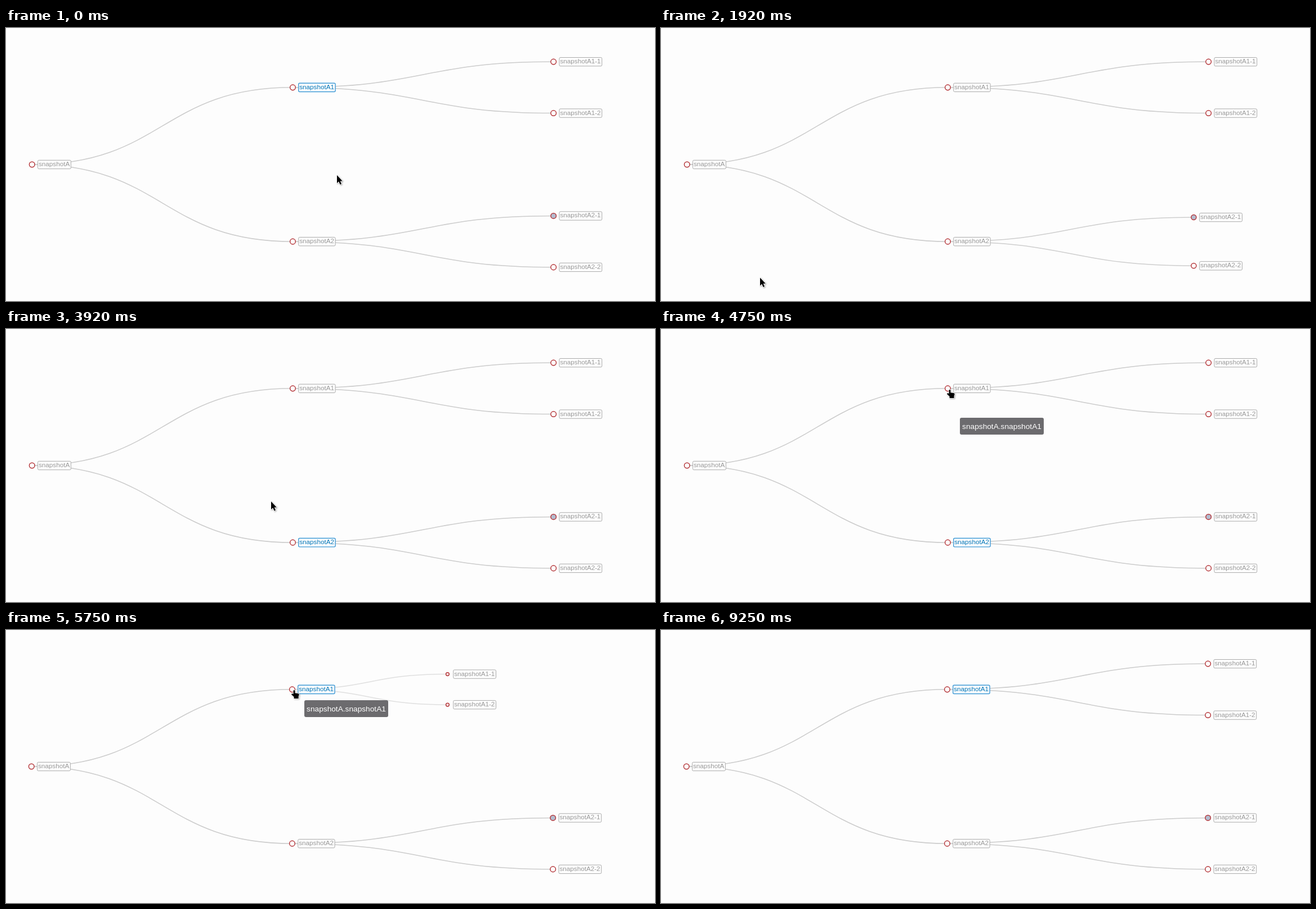
Animation of 1153x486 px, one loop 9960 ms. Source, as an HTML page:

```html
<!DOCTYPE html>
<html lang="en">
<head>
<meta charset="utf-8">
<title>Snapshot tree</title>
<style>
  html, body { margin: 0; width: 100%; height: 100%; overflow: hidden; background: #fdfdfd; }
  svg { display: block; width: 1153px; height: 486px; font-family: "Liberation Sans", Arial, sans-serif; }
  .link { fill: none; stroke: #ccc; stroke-width: 1.5; }
  .node circle { fill: #fff; stroke: #b5373b; stroke-width: 1.5; }
  .node.current circle { fill: #b3bccf; }
  .node rect { fill: #fdfdfd; stroke: #aaa; }
  .node text { fill: #999; font-size: 11.7px; }
  .node.selected rect { stroke: #3f9ad6; stroke-width: 1.4; }
  .node.selected text { fill: #0075b8; }
  #tip rect { fill: #6c6b6e; }
  #tip text { fill: #fff; font-size: 13.7px; text-anchor: middle; }
  #cursor path { stroke: #fff; stroke-width: 1.6; paint-order: stroke; stroke-linejoin: round; filter: drop-shadow(1px 1px 1px #0005); }
</style>
</head>
<body>
<svg viewBox="0 0 1153 486">
  <g id="tree"><g id="links"></g><g id="nodes"></g></g>
  <g id="tip"><rect width="149" height="30" rx="3"/><text x="74.5" y="20"></text></g>
  <g id="cursor">
    <path id="arrow" d="M0 0V14.3L3.2 11.3L5.6 16.8L8 15.8L5.7 10.5H9.8Z"/>
    <path id="hand" d="M1.6 1.8Q3 0 4.4 1.8V6.2L10.4 7Q11.8 7.6 11.6 9.4L10.6 12.5V16H2.6V13L-1.8 9Q-2 7 0 7.2L1.6 8Z"/>
  </g>
</svg>
<script>
const LOOP = 9960;
const MORPH = 500;
const RADIUS = 4.8;
const ROOT_X = 46.2, LEVEL_GAP = 463.25;
const TOP_Y = 60.1, LEAF_GAP = 91.45;

const $ = id => document.getElementById(id);
const clamp = v => Math.max(0, Math.min(1, v));
const lerp = (a, b, k) => a + (b - a) * k;
const lerpPoint = (p, q, k) => p.map((v, i) => lerp(v, q[i], k));
const cubicOut = v => 1 - (1 - clamp(v)) ** 3;
const cubicInOut = v => {
  const k = clamp(v);
  return k < .5 ? 4 * k ** 3 : 1 - 4 * (1 - k) ** 3;
};

// A branch starts to fold, then reverses from wherever it is
const folds = {
  snapshotA1: { fold: 5080, unfold: 5486 },
  snapshotA2: { fold: 1800, unfold: 2000 }
};

const tips = [
  { text: 'snapshotA.snapshotA2', show: 980, hide: 1790, from: [559, 300], to: [527, 396] },
  { text: 'snapshotA.snapshotA1', show: 4599, hide: 6540, from: [531, 396], to: [531, 125] }
];

const cursorStart = [588, 262];
const cursorMoves = [
  { start: 379, end: 380, to: [582, 261] },
  { start: 580, end: 1420, to: [507, 376] },
  { start: 1790, end: 1920, to: [176, 444.5] },
  { start: 1920, end: 2240, to: [87, 450] },
  { start: 3380, end: 3920, to: [471, 307] },
  { start: 4080, end: 4740, to: [510, 107] },
  { start: 5040, end: 5080, to: [509, 106] },
  { start: 6540, end: 6790, to: [523, 192] },
  { start: 8670, end: 9250, to: [142, 20] }
];

function add(parent, tag, attrs = {}) {
  const el = document.createElementNS('http://www.w3.org/2000/svg', tag);
  for (const key in attrs) el.setAttribute(key, attrs[key]);
  return parent.appendChild(el);
}

function place(el, [x, y]) {
  el.setAttribute('transform', `translate(${x} ${y})`);
}

function show(el, visible) {
  el.style.display = visible ? '' : 'none';
}

// Two children per node; sibling branches are one leaf gap further apart
function buildNode(name, depth, y, parent) {
  const node = { name, parent, pos: [ROOT_X + LEVEL_GAP * depth, y] };
  if (parent) node.link = add($('links'), 'path', { class: 'link' });
  node.el = add($('nodes'), 'g', { class: 'node' });
  node.circle = add(node.el, 'circle');
  const frame = add(node.el, 'rect', { x: 10.3, y: -7.6, height: 15.3, rx: 2 });
  const label = add(node.el, 'text', { x: 11.8, y: 3 });
  label.textContent = name;
  frame.setAttribute('width', label.getComputedTextLength() + 3.6);
  if (depth === 2) return [node];
  const offset = LEAF_GAP * (depth ? .5 : 1.5);
  const separator = depth ? '-' : '';
  return [node, ...[1, 2].flatMap(i =>
    buildNode(name + separator + i, depth + 1, y + (i === 1 ? -offset : offset), node))];
}

const nodes = buildNode('snapshotA', 0, TOP_Y + 2 * LEAF_GAP);
nodes.find(node => node.name === 'snapshotA2-1').el.classList.add('current');

function spreadAt(t, branch) {
  const times = branch && folds[branch.name];
  if (!times) return 1;
  const folded = cubicInOut((Math.min(t, times.unfold) - times.fold) / MORPH);
  return 1 - folded * (1 - cubicInOut((t - times.unfold) / MORPH));
}

function selectedAt(t) {
  if (t < 1790 || t >= 5080) return 'snapshotA1';
  return t >= 2710 ? 'snapshotA2' : '';
}

function drawNode(node, t) {
  const spread = spreadAt(t, node.parent);
  const from = (node.parent || node).pos;
  const [x, y] = lerpPoint(from, node.pos, spread);
  place(node.el, [x, y]);
  node.el.classList.toggle('selected', node.name === selectedAt(t));
  node.circle.setAttribute('r', RADIUS * spread);
  if (!node.link) return;
  const mid = (from[0] + x) / 2;
  node.link.setAttribute('d', `M${from}C${mid} ${from[1]} ${mid} ${y} ${x} ${y}`);
  node.link.style.opacity = spread;
}

function drawTip(t, shift) {
  const tip = tips.find(({ show, hide }) => t >= show && t < hide + 120);
  show($('tip'), tip);
  if (!tip) return;
  const [x, y] = lerpPoint(tip.from, tip.to, cubicOut((t - tip.show) / 300));
  place($('tip'), [Math.round(x) + shift, Math.round(y)]);
  $('tip').style.opacity = clamp((t - tip.show) / 120) * clamp(1 - (t - tip.hide) / 120);
  $('tip').lastChild.textContent = tip.text;
}

function drawCursor(t) {
  const position = cursorMoves.reduce((pos, { start, end, to }) =>
    lerpPoint(pos, to, cubicInOut((t - start) / (end - start))), cursorStart);
  const overNode = tips.some(({ show, hide }) => t >= show && t < hide + 40);
  place($('cursor'), position);
  show($('cursor'), t < 9230);
  show($('hand'), overNode);
  show($('arrow'), !overNode);
}

function draw() {
  const t = performance.now() % LOOP;
  const shift = t >= 5080 ? -1 : 0;
  place($('tree'), [shift, 0]);
  nodes.forEach(node => drawNode(node, t));
  drawTip(t, shift);
  drawCursor(t);
  requestAnimationFrame(draw);
}
draw();
</script>
</body>
</html>
```
